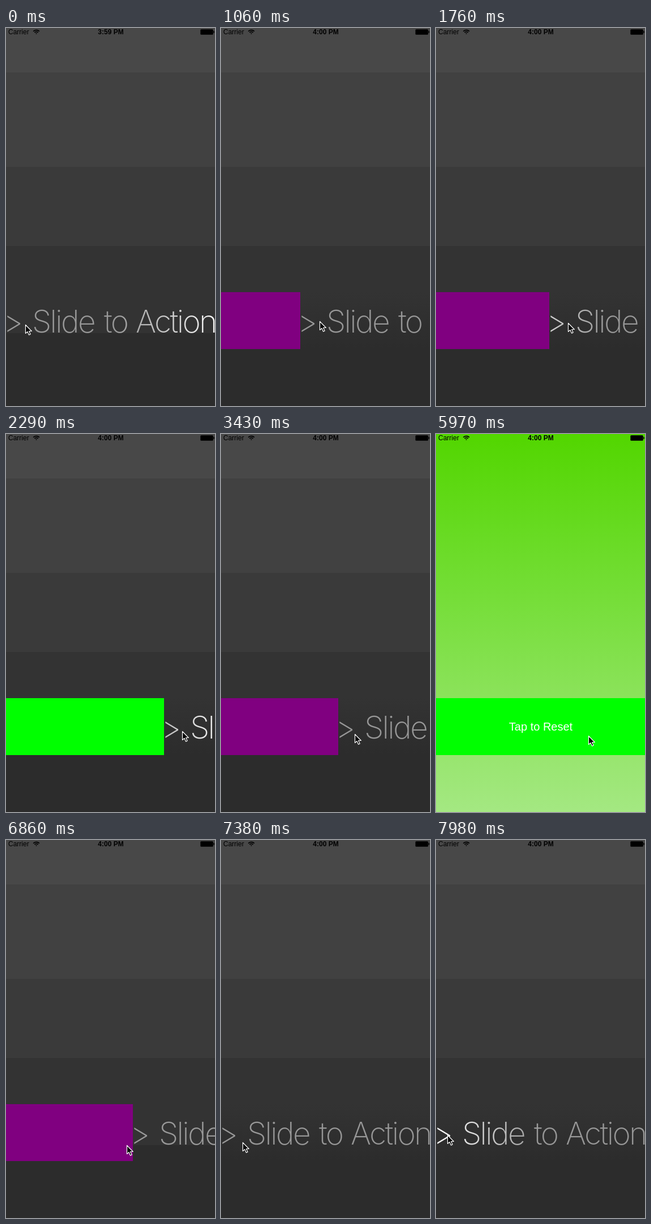
An HTML page with a canvas that plays this animation: 369 by 664 pixels, repeating every 8000 ms.

```html
<!DOCTYPE html>
<html lang="en">
<head>
<meta charset="utf-8">
<title>Slide to Action</title>
<style>
  html, body { margin: 0; width: 100%; height: 100%; overflow: hidden; background: #333; }
  canvas { display: block; width: 100%; height: 100%; }
</style>
</head>
<body>
<canvas id="stage" width="369" height="664"></canvas>
<script>
const W = 369, H = 664, LOOP = 8000;
const BAR = { y: 464, h: 100 };
const RELEASE = 4385, RESET = 6850;
const SANS = '"Liberation Sans", Arial, sans-serif';
const ctx = document.getElementById('stage').getContext('2d');

// Pointer moves: start, end, x, y. The first four drag the slider.
const MOVES = [
  [60, 1320, 180, 515], [1540, 2640, 326, 523], [2930, 3430, 236, 527], [3560, 4120, 323, 524],
  [5900, 6150, 213, 536], [6870, 7640, 16, 530], [7640, 7980, 20, 518]
];

const progress = (t, start, length) => Math.min(1, Math.max(0, (t - start) / length));
const easeOut = u => u * (2 - u);
const smooth = u => u * u * (3 - 2 * u);
const mix = (a, b, u) => a + (b - a) * u;

function pointerAt(t) {
  let x = 34, y = 521;
  for (const [start, end, toX, toY] of MOVES) {
    const u = easeOut(progress(t, start, end - start));
    x = mix(x, toX, u);
    y = mix(y, toY, u);
  }
  return { x: Math.round(x), y: Math.round(y) };
}

// The pointer's grip drifts slowly towards the edge while dragging.
function dragEdge(t) {
  return Math.max(0, Math.round(pointerAt(t).x - 36.3 + t / 500));
}

function edgeAt(t) {
  if (t < RELEASE) return dragEdge(t);
  if (t < RESET) return mix(dragEdge(RELEASE), W, smooth(progress(t, RELEASE + 10, 165)));
  return Math.round(224 * (1 - smooth(progress(t, RESET + 10, 180))));
}

function rect(color, x, y, w, h) {
  ctx.fillStyle = color;
  ctx.fillRect(x, y, w, h);
}

function text(string, x, y, font, align) {
  ctx.font = font;
  ctx.textAlign = align;
  ctx.fillText(string, x, y);
}

function gradient(x0, y0, x1, y1, ...colors) {
  const g = ctx.createLinearGradient(x0, y0, x1, y1);
  colors.forEach((c, i) => g.addColorStop(i / (colors.length - 1), c));
  return g;
}

function drawBackground(t) {
  if (t >= RELEASE && t < RESET) {
    rect(gradient(0, 0, 0, H, '#52d600', '#a4e882'), 0, 0, W, H);
    return;
  }
  [0, 78, 244, 383, 536].forEach((y, i) => {
    const v = 72 - 7 * i;
    rect(`rgb(${v},${v},${v})`, 0, y, W, H - y);
  });
  // Once redrawn, the slider row blends its two bands.
  if (t >= 90 && t < RELEASE || t > RESET + 80) {
    rect(gradient(0, BAR.y, 0, BAR.y + BAR.h, '#333', '#2c2c2c'), 0, BAR.y, W, BAR.h);
  }
}

function drawStatus(t) {
  ctx.fillStyle = ctx.strokeStyle = '#000';
  text('Carrier', 4, 11, '12px ' + SANS, 'left');
  text(t < 975 ? '3:59 PM' : '4:00 PM', 185, 11, 'bold 12px ' + SANS, 'center');

  // Wi-Fi fan
  const up = -Math.PI / 2, spread = 0.8;
  ctx.lineWidth = 1.6;
  for (const r of [1.2, 4.4, 7.4]) {
    ctx.beginPath();
    ctx.arc(53.5, 11, r, up - spread, up + spread);
    ctx.stroke();
  }

  // Battery
  ctx.beginPath();
  ctx.roundRect(343.3, 2.3, 22.4, 9.4, 1.5);
  ctx.fill();
  rect('#000', 366.2, 5.3, 1.5, 3.4);
}

function drawSlider(t, edge) {
  const armed = edge > 255 && t < RESET;
  rect(armed ? '#00ff00' : '#800080', 0, BAR.y, edge, BAR.h);

  // The shine crosses three label widths every three seconds.
  const span = 3 * W, half = W / 2, dim = 'rgba(255,255,255,.5)';
  const shine = (W * 2 + 7 + t * span / 3000) % span - W;
  ctx.save();
  ctx.translate(edge, 0);
  ctx.fillStyle = gradient(shine - half, 0, shine + half, 0, dim, '#fff', dim);
  ctx.letterSpacing = '-2.6px';
  for (const [word, x] of [['>', -5], ['Slide', 46], ['to', 173], ['Action', 229]]) {
    text(word, x, 534.5, '200 55px Inter, Roboto, sans-serif', 'left');
  }
  ctx.restore();
}

function drawLabel(t) {
  if (t >= RESET) return;
  ctx.fillStyle = `rgba(255,255,255,${progress(t, 4660, 590)})`;
  text('Tap to Reset', 185, 521, '20px ' + SANS, 'center');
}

function drawPointer({ x, y }) {
  ctx.save();
  ctx.translate(x + 0.5, y + 0.5);
  const arrow = new Path2D('M0 0V15L3.4 11.9 6 17.6 8.6 16.5 6.1 11H10.8Z');
  ctx.fillStyle = '#000';
  ctx.strokeStyle = '#fff';
  ctx.lineWidth = 1.2;
  ctx.lineJoin = 'round';
  ctx.fill(arrow);
  ctx.stroke(arrow);
  ctx.restore();
}

function draw(t) {
  drawBackground(t);
  drawStatus(t);
  drawSlider(t, edgeAt(t));
  drawLabel(t);
  drawPointer(pointerAt(t));
}

const began = performance.now();
function tick() {
  draw((performance.now() - began) % LOOP);
  requestAnimationFrame(tick);
}
tick();
</script>
</body>
</html>
```
